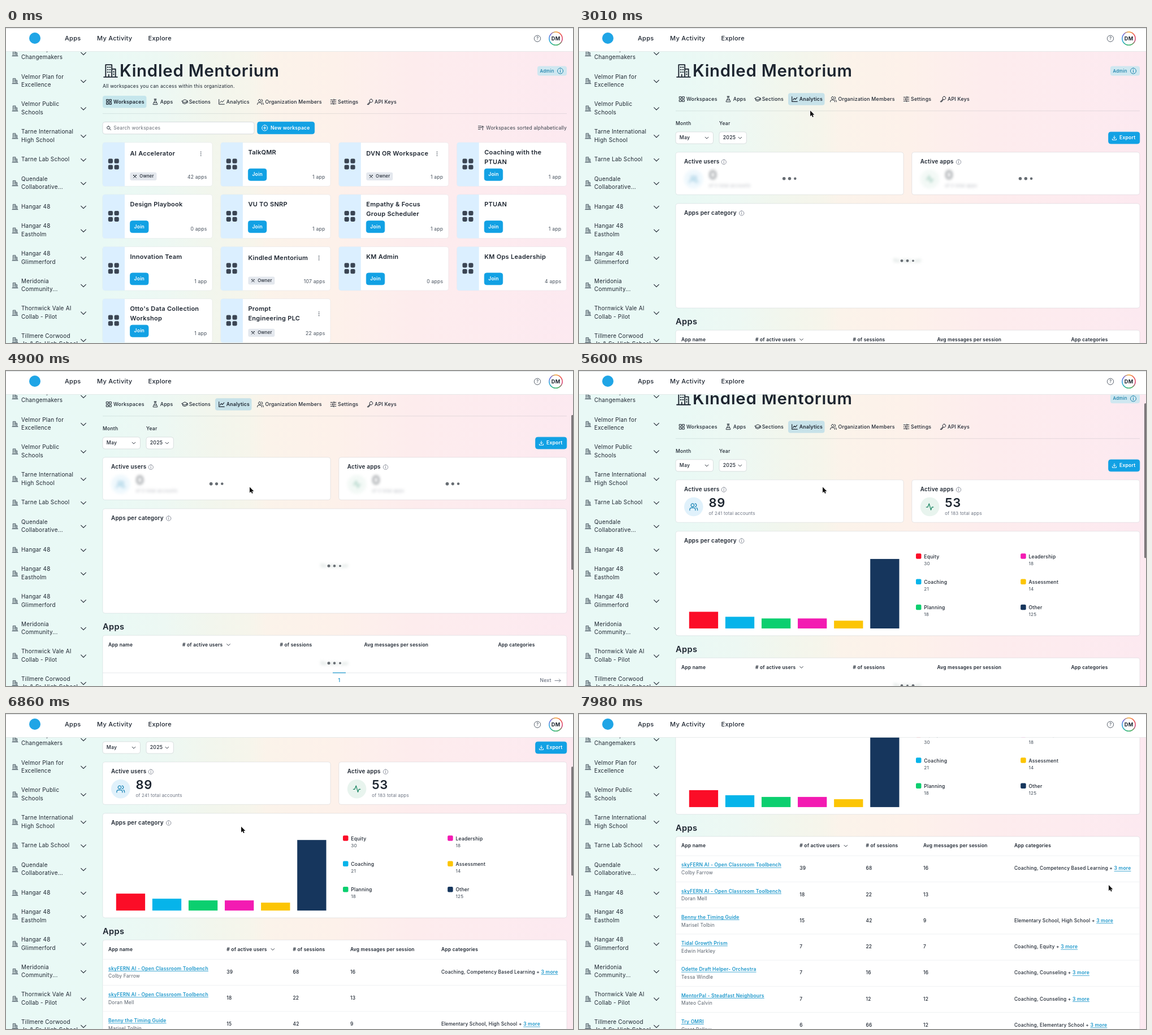
An HTML page with a canvas that plays this animation: 1003x558 px, repeating every 8 s.

```html
<!DOCTYPE html>
<html lang="en">
<head>
<meta charset="utf-8">
<title>Workspace analytics</title>
<style>
html, body { margin: 0; width: 100%; height: 100%; overflow: hidden; background: #fff; }
canvas { display: block; width: 1003px; height: 558px; }
</style>
</head>
<body>
<canvas id="stage"></canvas>
<script>
const W = 1003, H = 558, LOOP = 8000, STEP = 70;
const canvas = document.getElementById('stage');
const ctx = canvas.getContext('2d');
const dpr = window.devicePixelRatio || 1;
canvas.width = W * dpr;
canvas.height = H * dpr;

const INK = '#1d2530', SOFT = '#46505c', GREY = '#6b7280', BLUE = '#12a1e4', LINK = '#1c97cb';
const ORG = 'Kindled Mentorium';

// ---- timing ----
const OPEN = 2800, STATS = 5080, TABLE = 5880;
const clamp = v => Math.max(0, Math.min(1, v));
const part = (t, a, b) => clamp((t - a) / (b - a));
const smooth = u => u * u * (3 - 2 * u);
const mix = (a, b, u) => a + (b - a) * u;

function scrollAt(t) {
  if (t < 5320) return 67 * smooth(part(t, 3604, 4404));
  if (t < 6440) return 67 * (1 - part(t, 5320, 6090)) ** 2;
  return 318.3 * smooth(part(t, 6440, 7210) ** 1.32);
}

const PATH = [
  [350, 290, 340], [1120, 409, 128], [1260, 403, 130], [2800, 403, 130], [3500, 431, 205.5],
  [5880, 431, 205.5], [6090, 358, 172], [6300, 416, 199.5], [7490, 416, 199.5],
  [7630, 727, 258], [7700, 727, 258], [7980, 937, 303]
];
function cursorAt(t) {
  const i = PATH.findIndex(p => p[0] >= t);
  if (i < 1) return PATH[i < 0 ? PATH.length - 1 : 0].slice(1);
  const [a, b] = [PATH[i - 1], PATH[i]], u = smooth(part(t, a[0], b[0]));
  return [mix(a[1], b[1], u), mix(a[2], b[2], u)];
}

// ---- drawing helpers ----
function text(s, x, y, size = 8.5, weight = 500, color = INK, align = 'left') {
  ctx.font = `${weight} ${size}px Inter, sans-serif`;
  ctx.letterSpacing = size * 0.025 + 'px';
  ctx.textAlign = align;
  ctx.textBaseline = 'middle';
  ctx.fillStyle = color;
  ctx.fillText(s, x, y);
  return ctx.measureText(s).width;
}

function link(s, x, y, size = 8.5) {
  const w = text(s, x, y, size, 600, LINK);
  ctx.fillRect(x, y + 4, w, 0.8);
}

function box(x, y, w, h, r, fill, stroke) {
  ctx.beginPath();
  ctx.roundRect(x, y, w, h, r);
  if (fill) { ctx.fillStyle = fill; ctx.fill(); }
  if (stroke) { ctx.strokeStyle = stroke; ctx.lineWidth = 0.8; ctx.stroke(); }
}

const panel = (x, y, w, h) => box(x, y, w, h, 4, '#fff', 'rgba(40,60,80,.13)');
const button = (x, y, w, h) => box(x, y, w, h, 4, BLUE, BLUE);

function disc(x, y, r, fill) {
  ctx.beginPath();
  ctx.arc(x, y, r, 0, 7);
  ctx.fillStyle = fill;
  ctx.fill();
}

// Icons live on a 24-unit grid.
const RING = 'M12 2a10 10 0 1 0 .01 0';
const ICONS = {
  grid: 'M3 3h7v7H3zM14 3h7v7h-7zM3 14h7v7H3zM14 14h7v7h-7z',
  flask: 'M8 2h8M10 2v7L4 20q-1 2 1 2h14q2 0 1-2L14 9V2M7 15h10',
  cap: 'M12 4L1 9.5l11 5.5 11-5.5zM5 12v5q7 5 14 0v-5M23 10v6',
  chart: 'M2 3v18h20M6 15l5-6 4 4 6-7',
  users: 'M9 3a4.5 4.5 0 1 0 .01 0M1 22v-2q0-5 5-5h6q5 0 5 5v2M16 3q4 1 4 4.5t-4 4.5M23 22v-2q0-4-3-5',
  sliders: 'M2 5h8M14 5h8M2 12h3M9 12h13M2 19h12M18 19h4M14 2v6M9 9v6M14 16v6',
  key: 'M16 2a6 6 0 1 0 .01 0M11.5 12L2 21v1h5v-3h3v-3l3-2',
  search: 'M10 3a7 7 0 1 0 .01 0M15 15l6 6',
  plus: RING + 'M12 7v10M7 12h10',
  info: RING + 'M12 11v6M12 7v1',
  building: 'M1 22h22M4 22V2h10v20M14 9h6v13M7 6h1M10.5 6h1M7 10h1M10.5 10h1M7 14h1M10.5 14h1M9 22v-4M17 13v1M17 17v1',
  download: 'M12 3v12M7 10l5 5 5-5M3 16v5h18v-5',
  pulse: 'M2 13h4l4-10 5 18 3-8h4',
  sort: 'M1 5h12M1 11h12M1 17h8M18 20V5M14 9l4-4 4 4',
  tool: 'M4 4l16 16M20 4L4 20M3 7l4-4M17 3l4 4',
  down: 'M4 8l8 8 8-8',
  arrow: 'M1 12h22M17 6l6 6-6 6'
};
for (const k in ICONS) ICONS[k] = new Path2D(ICONS[k]);

function icon(name, x, y, size, color = INK, line = 1) {
  const s = size / 24;
  ctx.save();
  ctx.translate(x - size / 2, y - size / 2);
  ctx.scale(s, s);
  ctx.lineWidth = line / s;
  ctx.lineCap = ctx.lineJoin = 'round';
  ctx.strokeStyle = color;
  ctx.stroke(ICONS[name]);
  ctx.restore();
}

// ---- frame of the page ----
const SIDEBAR = [
  [45, 'University', 'Changemakers'], [94, 'Velmor Plan for', 'Excellence'],
  [142.5, 'Velmor Public', 'Schools'], [191.3, 'Tarne International', 'High School'],
  [233.3, 'Tarne Lab School'], [275, 'Quendale', 'Collaborative...'], [317, 'Hangar 48'],
  [358.7, 'Hangar 48', 'Eastholm'], [407.3, 'Hangar 48', 'Glimmerford'],
  [456, 'Meridonia', 'Community...'], [504.6, 'Thornwick Vale AI', 'Collab - Pilot'],
  [553, 'Tillmere Corwood', 'Jr. & Sr. High School']
];

const backdrop = ctx.createLinearGradient(0, 0, W, 0);
[[0, '#e9f9f6'], [.17, '#e9f9f5'], [.28, '#edf8f3'], [.36, '#f2f6ed'], [.43, '#f6f5eb'], [.46, '#fbf3ea'],
 [.58, '#fdf1ea'], [.64, '#fdefec'], [.72, '#fdeced'], [.86, '#fdebef'], [1, '#fce9f0']]
  .forEach(([at, c]) => backdrop.addColorStop(at, c));

const rainbow = ctx.createConicGradient(-Math.PI / 2, 972.5, 18.7);
['#f5a623', '#e8433f', '#d6336c', '#3fae5a', '#2fb380', '#1aa3e0', '#6a5bd8', '#f5a623']
  .forEach((c, i) => rainbow.addColorStop(i / 7, c));

function drawSidebar() {
  for (const [y, ...lines] of SIDEBAR) {
    icon('building', 16, y, 11, '#3c4955', 0.9);
    icon('down', 137, y + 0.5, 13, INK, 1.1);
    const top = lines.length > 1 ? y - 7.2 : y;
    lines.forEach((s, i) => text(s, 27, top + i * 14.5, 9.9, 400));
  }
}

function drawHeader() {
  ctx.fillStyle = '#fff';
  ctx.fillRect(0, 0, W, 41);
  ctx.fillStyle = '#e3e8e8';
  ctx.fillRect(0, 41, W, 0.8);
  ctx.fillStyle = '#d3d6d8';
  ctx.fillRect(0, 0, W, 0.8);
  disc(51, 18, 10, '#1fa5e6');
  text('Apps', 104, 18.3, 11);
  text('My Activity', 161, 18.3, 11);
  text('Explore', 251.5, 18.3, 11);
  ctx.beginPath();
  ctx.arc(940, 18.7, 5.6, 0, 7);
  ctx.lineWidth = 0.9;
  ctx.strokeStyle = SOFT;
  ctx.stroke();
  text('?', 940.2, 18.9, 8, 500, SOFT, 'center');
  ctx.beginPath();
  ctx.arc(972.5, 18.7, 11.6, 0, 7);
  ctx.lineWidth = 1.5;
  ctx.strokeStyle = rainbow;
  ctx.stroke();
  text('DM', 972.6, 18.9, 9.2, 700, INK, 'center');
}

const TABS = [
  ['grid', 'Workspaces', 182, 190], ['flask', 'Apps', 264, 272.7], ['cap', 'Sections', 316, 323.7],
  ['chart', 'Analytics', 381.5, 389.7], ['users', 'Organization Members', 450, 458.5],
  ['sliders', 'Settings', 579, 587], ['key', 'API Keys', 644, 652]
];

function drawTop(active, y, hover) {
  icon('building', 185, 76, 26, INK, 1.9);
  text(ORG, 201, 77, 29.4, 600);
  box(940, 67.5, 52, 17, 4, '#cfe7f0');
  text('Admin', 944.5, 76.2, 7.9, 500, '#167ea8');
  icon('info', 980.5, 76, 12, '#167ea8', 1);
  if (active) box(370, y - 10.7, 64.5, 21.5, 4, '#c7e2e9');
  else box(171, y - 10.7, 77.5, 21.5, 4, '#c5e6ec');
  if (hover) box(371, y - 10.7, 64, 21.5, 4, 'rgba(185,222,226,.5)');
  TABS.forEach(([ic, s, ix, tx], i) => {
    const on = i === (active ? 3 : 0);
    icon(ic, ix, y, 11.5, INK, on ? 1.15 : 1);
    text(s, tx, y + 0.2, on ? 8.7 : 8.8, on ? 600 : 500);
  });
  ctx.fillStyle = 'rgba(60,80,90,.14)';
  ctx.fillRect(171, y + 20.4, 821, 0.9);
}

// ---- workspaces ----
const WORKSPACES = [
  ['AI Accelerator', 42, 1], ['TalkQMR', 1], ['DVN OR Workspace', 1, 1], ['Coaching with the|PTUAN', 1],
  ['Design Playbook', 0], ['VU TO SNRP', 1], ['Empathy & Focus|Group Scheduler', 1], ['PTUAN', 1],
  ['Innovation Team', 1], [ORG, 107, 1], ['KM Admin', 0], ['KM Ops Leadership', 4],
  ["Otto's Data Collection|Workshop", 1], ['Prompt|Engineering PLC', 22, 1]
];

function drawWorkspace([name, count, owner], i) {
  const x = 171 + (i % 4) * 208.9, y = 202.8 + Math.floor(i / 4) * 92.3;
  const lines = name.split('|');
  box(x, y, 194, 77.5, 4, '#fff', 'rgba(40,60,80,.08)');
  box(x, y, 39, 77.5, [4, 0, 0, 4], '#dbefff');
  for (let k = 0; k < 4; k++)
    box(x + 9.8 + (k % 2) * 10.8, y + 28.8 + (k >> 1) * 10.8, 8.2, 8.2, 2.3, '#3b4553');
  lines.forEach((s, k) =>
    text(s, x + 48.5, y + (owner && lines.length < 2 ? 20 : 17.8) + k * 17, 11, 600));
  if (owner) {
    for (let k = -1; k < 2; k++) disc(x + 173.7, y + (lines.length < 2 ? 20 : 26.5) + k * 3.2, 0.85, SOFT);
    box(x + 48.5, y + 53, 47, 14.2, 3, '#e4e8ee');
    icon('tool', x + 57, y + 60.2, 7, INK, 1);
    text('Owner', x + 65.3, y + 60.3, 7.7, 500);
  } else {
    button(x + 48.5, y + 46.5, 32.5, 21);
    text('Join', x + 64.8, y + 57, 8.6, 600, '#fff', 'center');
  }
  text(`${count} app${count === 1 ? '' : 's'}`, x + 184.5, y + 61.7, 8.6, 400, SOFT, 'right');
}

function drawWorkspaces(t) {
  const [cx, cy] = cursorAt(t);
  drawTop(false, 130.8, t >= 350 && cx > 371 && cx < 435 && cy < 141);
  text('All workspaces you can access within this organization.', 171, 103, 8.45, 400);
  box(171, 166.5, 268, 21.3, 4, '#fff', '#cfd5d8');
  icon('search', 182, 177.3, 9, INK, 1);
  text('Search workspaces', 190.3, 177.2, 8.5, 400, '#6a7078');
  button(444.7, 166.3, 101, 21.4);
  icon('plus', 457.7, 177, 12, '#fff', 1);
  text('New workspace', 468, 177.1, 8.6, 600, '#fff');
  icon('sort', 840.5, 177, 11, INK, 0.9);
  text('Workspaces sorted alphabetically', 992, 177.2, 8.5, 400, '#353d47', 'right');
  WORKSPACES.forEach(drawWorkspace);
}

// ---- analytics ----
const CATEGORIES = [
  ['Equity', 30, '#fb0d27'], ['Coaching', 21, '#06b4ea'], ['Planning', 18, '#0bcf6f'],
  ['Leadership', 18, '#f31bb2'], ['Assessment', 14, '#fcc504'], ['Other', 125, '#16365d']
];
const ROWS = [
  ['skyFERN AI - Open Classroom Toolbench', 'Colby Farrow', 39, 68, 16, 'Coaching, Competency Based Learning'],
  ['skyFERN AI - Open Classroom Toolbench', 'Doran Mell', 18, 22, 13, ''],
  ['Benny the Timing Guide', 'Marisel Tolbin', 15, 42, 9, 'Elementary School, High School'],
  ['Tidal Growth Prism', 'Edwin Harkley', 7, 22, 7, 'Coaching, Equity'],
  ['Odette Draft Helper- Orchestra', 'Tessa Windle', 7, 16, 16, 'Coaching, Counseling'],
  ['MentorPal - Steadfast Neighbours', 'Mateo Calvin', 7, 12, 12, 'Coaching, Counseling'],
  ['Try OMRI', 'Grant Pollow', 6, 66, 12, 'Coaching, Elementary School']
];

function blurred(draw) {
  ctx.save();
  ctx.filter = `blur(${2.6 * dpr}px)`;
  ctx.globalAlpha = 0.5;
  draw();
  ctx.restore();
}

function dots(x, y, gap, r, t) {
  for (let k = -1; k < 2; k++)
    disc(x + k * gap, y, r + 0.35 * Math.sin((t / 980 - k / 3) * 2 * Math.PI), '#666c72');
}

function loading(y, t) {
  blurred(() => text('No data yet', 581, y + 0.5, 8.6, 400, '#7d9a92', 'center'));
  dots(581, y, 10, 2.2, t);
}

function drawStat(x, title, infoX, ic, color, tint, value, note, t) {
  panel(x, 220, 403, 75.3);
  text(title, x + 15, 237.3, 9.9, 600);
  icon('info', infoX, 237.3, 10, GREY, 0.8);
  const body = (n, s) => {
    disc(x + 31.8, 267.7, 16.8, tint);
    icon(ic, x + 31.8, 267.7, 15, color, 1.2);
    text(n, x + 58.5, 261.8, 22, 600);
    text(s, x + 58.5, 279.8, 7.95, 400, GREY);
  };
  if (t >= STATS) return body(value, `of ${note}`);
  blurred(() => body('0', 'of 0' + note.replace(/^\d+/, '')));
  dots(x + 201.5, 266.8, 9.8, 2.6, t);
}

function drawChart(t) {
  panel(171, 311, 821, 185);
  text('Apps per category', 186, 328.2, 9.9, 600);
  icon('info', 287.7, 328, 10, GREY, 0.8);
  if (t < STATS) return loading(412.3, t);
  const grow = 1 - (1 - part(t, STATS, STATS + 800)) ** 4;
  CATEGORIES.forEach(([name, n, color], i) => {
    ctx.fillStyle = color;
    ctx.fillRect(194.8 + i * 64.08, 483.2 - n * grow, 51.3, n * grow);
    const x = i < 3 ? 596 : 781.2, y = 355 + (i % 3) * 45.3;
    box(x, y - 4.7, 9.5, 9.5, 2, color);
    text(name, x + 14.3, y + 1.2, 8.6, 500);
    text(n, x + 14.3, y + 13.4, 8.2, 400, SOFT);
  });
}

function drawTable(t) {
  const ready = t >= TABLE;
  const cols = ready ? [181, 390.3, 507.5, 609, 770] : [181, 312, 484.5, 633.5, 870.5];
  text('Apps', 171, 521, 14.6, 600);
  panel(171, 535.3, 821, ready ? 420 : 95);
  ['App name', '# of active users', '# of sessions', 'Avg messages per session', 'App categories']
    .forEach((s, i) => text(s, cols[i], 552.2, 8.45, 600));
  icon('down', cols[1] + 81.5, 552, 8.5, INK, 0.9);
  if (!ready) {
    loading(584.5, t);
    ctx.fillStyle = '#dfe4e8';
    ctx.fillRect(171, 601.4, 821, 0.8);
    ctx.fillStyle = LINK;
    ctx.fillRect(578, 601, 23, 1.2);
    text('1', 589.3, 615.4, 8.5, 600, LINK, 'center');
    text('Next', 944.5, 615.4, 8.6, 500, GREY);
    icon('arrow', 976, 615.4, 11, GREY, 0.9);
    return;
  }
  ROWS.forEach(([app, who, users, sessions, avg, tags], i) => {
    const y = 592 + i * 46.25;
    ctx.fillStyle = '#eceff1';
    ctx.fillRect(171.4, y - 23, 820, 0.8);
    link(app, 181, y - 6);
    text(who, 181, y + 7.8, 8.5, 400, '#59626d');
    [users, sessions, avg].forEach((n, k) => text(n, cols[k + 1], y + 0.2, 8.4));
    if (tags) link('3 more', 770 + text(tags + ' + ', 770, y + 0.2, 8.4), y + 0.2);
  });
}

function drawSelect(label, value, x, w) {
  text(label, x, 169.3, 8.6, 500);
  box(x, 184, w, 21, 4, '#fff', '#d2d8da');
  text(value, x + 6.8, 194.7, 8.7, 500);
  icon('down', x + w - 11.5, 194.7, 8.5, INK, 0.9);
}

function drawAnalytics(t) {
  ctx.save();
  ctx.translate(0, -scrollAt(t));
  drawTop(true, 126);
  drawSelect('Month', 'May', 171, 66.5);
  drawSelect('Year', '2025', 248, 48.3);
  button(936.6, 184.2, 55.2, 20.8);
  icon('download', 947, 194.7, 9.5, '#fff', 1);
  text('Export', 956, 194.8, 8.6, 600, '#fff');
  drawStat(171, 'Active users', 256.2, 'users', '#1380b3', '#e0f1fb', '89', '241 total accounts', t);
  drawStat(588.8, 'Active apps', 671.5, 'pulse', '#12805c', '#e8f4ee', '53', '183 total apps', t);
  drawChart(t);
  drawTable(t);
  ctx.restore();
}

// ---- overlays ----
function drawScrollbar(t) {
  if (t < 3600) return;
  const ready = t >= TABLE, rate = ready ? 0.373 : 0.523;
  ctx.globalAlpha = 1 - part(t, 7700, 7980);
  box(1000, 43 + scrollAt(t) * rate, 4, ready ? 193 : 274, 1.5, '#7b7679');
  ctx.globalAlpha = 1;
}

const ARROW = new Path2D('M0 0V10.2L2.4 8 4 11.6 5.8 10.8 4.2 7.4H7.4z');
const HAND = new Path2D('M3 0q1 0 1 1v4l3.6.9q1.6.5 1.2 2.1l-1 4H3.2L.2 8.2q-.5-1.6.8-1.2l1 .9V1q0-1 1-1z');

function drawCursor(t) {
  if (t < 350) return;
  const [x, y] = cursorAt(t), hand = y < 141 && t < 3500;
  ctx.save();
  ctx.translate(hand ? x - 2.5 : x, y);
  ctx.lineJoin = 'round';
  ctx.lineWidth = hand ? 0.9 : 1.4;
  ctx.strokeStyle = hand ? '#111' : '#fff';
  ctx.fillStyle = hand ? '#fff' : '#111';
  ctx.stroke(hand ? HAND : ARROW);
  ctx.fill(hand ? HAND : ARROW);
  ctx.restore();
}

function drawStatusBar(t) {
  if (t < 1680 || t >= OPEN + STEP) return;
  ctx.globalAlpha = part(t, 1610, 1890);
  box(-4, 554.5, 277, 10, 4, '#dfe3e6', '#c8cdd0');
  ctx.globalAlpha = 1;
}

function draw(now) {
  const t = Math.floor((now % LOOP) / STEP) * STEP;
  ctx.setTransform(dpr, 0, 0, dpr, 0, 0);
  ctx.fillStyle = backdrop;
  ctx.fillRect(0, 0, W, H);
  drawSidebar();
  if (t < OPEN) drawWorkspaces(t);
  else drawAnalytics(t);
  drawHeader();
  drawScrollbar(t);
  drawStatusBar(t);
  drawCursor(t);
}

const start = performance.now();
function tick() {
  draw(performance.now() - start);
  requestAnimationFrame(tick);
}
tick();
</script>
</body>
</html>
```
